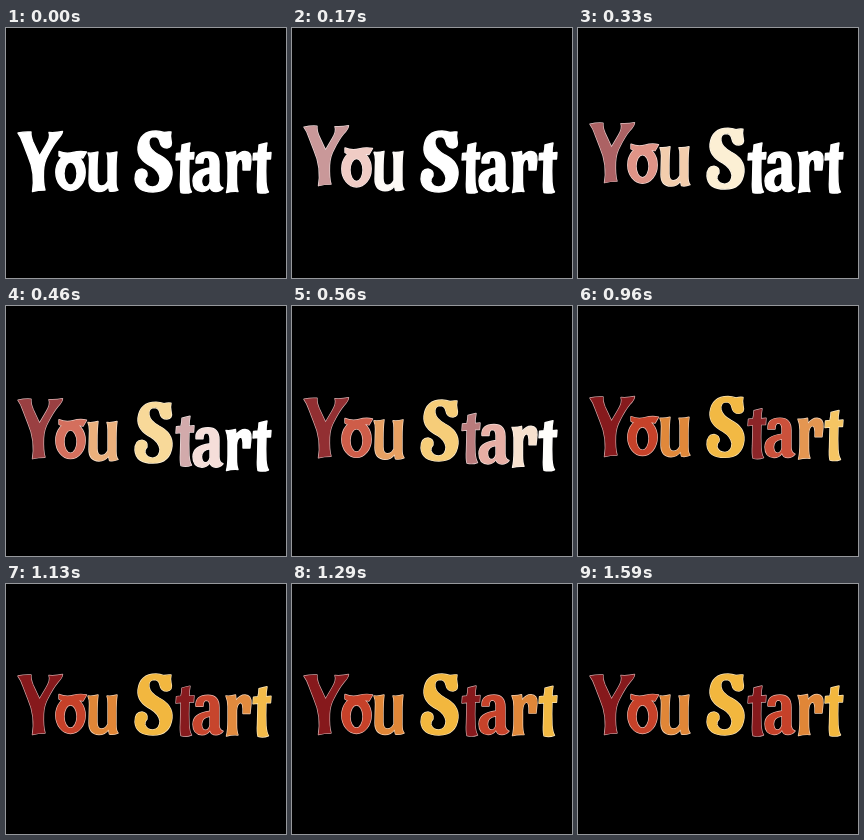
These frames come from a looping animation (280 px wide and 250 px high, 1660 ms). An HTML page:

```html
<!DOCTYPE html>
<html lang="en">
<head>
<meta charset="utf-8">
<title>You Start</title>
<style>
  html, body { margin: 0; width: 100%; height: 100%; overflow: hidden; background: #000; }
  svg { display: block; width: 280px; height: 250px; }
  #word { stroke-width: 1.4; stroke-linejoin: round; paint-order: stroke; }
</style>
</head>
<body>
<svg viewBox="0 0 280 250" role="img" aria-label="You Start">
  <defs>
    <path id="t" d="M6 -7Q9.500 -8 14 -9Q13 -4 13 1L18 .5L17.500 7L13 7Q12.500 20 13 30Q13.500 37 15.500 40Q10 42 5 40.500Q4 36 4.500 28L5 7.500L0 8L.5 1.500L5 1Q6 -3 6 -7Z"/>
  </defs>
  <g id="word">
    <path d="M12 92Q19 90.500 25 91Q24.500 95 27 101L33.500 115L40 104Q45 96 43 91.500Q50 92 56.500 90.500Q56 94 52 98Q47 104 42 114Q38 121 37.500 130Q37 143 39 149Q32 149 26.500 150.500Q28 143 27 133Q26 124 22 115L17 102Q15 96 12 92Z"/>
    <path d="M64.500 113A14.500 18 0 0 1 64.500 149.500A14.500 18 0 0 1 64.500 113ZM64.500 121A6.500 11.500 0 0 0 64.500 144A6.500 11.500 0 0 0 64.500 121ZM53 110.500Q60 113.500 67 111.500Q74 109.500 80.500 111L77 117Q70 115 64 118Q57 118 53 115Z"/>
    <path d="M82 112Q87 112.500 92 111Q91 118 91 130L91 138Q91 145 95.500 145Q99.500 145 102 140L102 119Q102 114 101 112Q106 112.500 111 111Q110 117 110 128L110 141Q110 147 112 149Q107 151 103.500 150L102.500 145.500Q99 150.500 93 150.500Q83 150 83 139L83.500 120Q83.500 115 82 112Z"/>
    <path d="M165 99Q167 106.500 161 107Q155 107 154 101Q153 95.500 148 95.500Q142 96 143 103Q144 109 153 114Q167 121 166 134Q164 151 147 151Q130 151 129 138Q129 128 136 128Q142 129 141 135Q138 138 139 141Q141 146 147 146Q154 145 154 137Q153 130 145 125Q131 118 132 106Q134 90 150 90Q154 90 158 91.500Q162 90.500 165 91Q164 95 165 99Z"/>
    <use href="#t" x="170" y="111"/>
    <path d="M190 122Q189 111 202 111Q213 111 213 123L213 140Q213 146 217 147Q214 150.500 210 150.500Q205 150.500 204 146Q201 150.500 196 150.500Q187 150 187 140Q187 129 204 127L204 122Q204 116 200 116Q197 116.500 197 122ZM204 132Q195.500 133 195.500 140Q196 146 199.500 146Q203 146 204 141Z"/>
    <path d="M220 111.500Q225 112 229.500 110.500L230 116Q234 110.500 239 110.500Q245.500 111 245 119L244 129L237 129Q237.500 118 234.500 118Q231 119 230.500 126L230.500 140Q230.500 147 232 150.500Q226 150 220.500 151.500Q222 146 222 136L222 122Q222 116 220 111.500Z"/>
    <use href="#t" x="247" y="111"/>
  </g>
</svg>
<script>
const LOOP = 1660, STEP = LOOP / 50, STAGGER = 75, DURATION = 1200, DROP = 13;
const palette = [[134, 25, 28], [198, 65, 41], [224, 134, 55], [242, 183, 62]];
const letters = [...document.getElementById('word').children];

const easeOut = p => 1 - (1 - p) ** 4;
const clamp = p => Math.max(0, Math.min(1, p));
const tint = (rgb, k) => `rgb(${rgb.map(c => Math.round(255 + (c - 255) * k))})`;

function draw(now) {
  const time = Math.floor((now % LOOP) / STEP) * STEP;
  letters.forEach((letter, i) => {
    const k = easeOut(clamp((time - i * STAGGER) / DURATION));
    const rgb = palette[i % 4];
    letter.setAttribute('transform', `translate(0 ${DROP * (1 - k)})`);
    letter.setAttribute('fill', tint(rgb, k));
    letter.setAttribute('stroke', tint(rgb, k * 0.4)); // pale rim
  });
}

let start;
function tick(now) {
  start ??= now;
  draw(now - start);
  requestAnimationFrame(tick);
}
draw(0);
requestAnimationFrame(tick);
</script>
</body>
</html>
```
